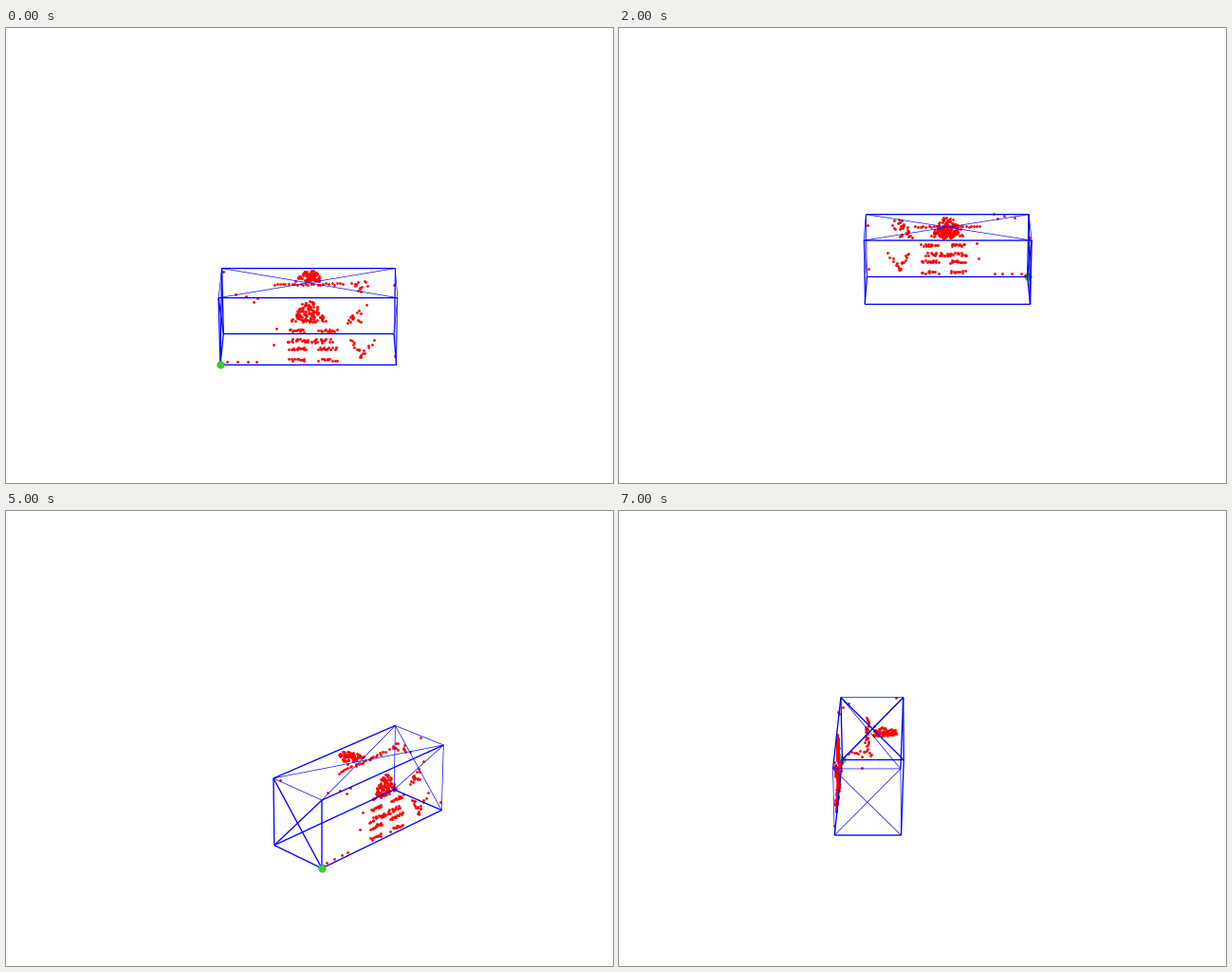
A matplotlib script that plays this animation: 640 px wide and 480 px high, repeating every 8000 ms.

```python
from itertools import combinations, product

import numpy as np
import matplotlib.pyplot as plt
from matplotlib.animation import FuncAnimation
from matplotlib.collections import LineCollection

W, H, DPI = 640, 480, 100
CX, CY, SCALE, DIST = 333.0, 237.4, 1997.8, 10.0
SIN, COS = np.sin(np.radians(25)), np.cos(np.radians(25))
AZIMUTHS = [270, 45, 90, 135, 180, 225, 315, 0]

X0, X1 = -0.5195, 0.381
Y0, Y1 = -0.5195, -0.1745
Z0, Z1 = -0.3896, -0.0065

rng = np.random.default_rng(7)


def project(p, azim):
    """Perspective view of 3D points as stage pixels."""
    x, y, z = np.moveaxis(np.asarray(p, float), -1, 0)
    a = np.radians(azim)
    right = y * np.cos(a) - x * np.sin(a)
    near = x * np.cos(a) + y * np.sin(a)
    dist = DIST - near * COS - z * SIN
    up = z * COS - near * SIN
    return np.stack([CX + SCALE * right / dist, CY - SCALE * up / dist], -1)


def on_front(pts):
    """Lift points of the front view onto the box's front face."""
    px, py = np.asarray(pts, float).T
    s = (CY - py) / SCALE
    z = (s * (DIST + Y0 * COS) - Y0 * SIN) / (COS + s * SIN)
    x = (px - CX) / SCALE * (DIST + Y0 * COS - z * SIN)
    return np.stack([x, np.full_like(x, Y0), z], -1)


def on_top(pts):
    """Lift points of the front view onto the box's top face."""
    px, py = np.asarray(pts, float).T
    s = (CY - py) / SCALE
    near = (Z1 * COS - s * (DIST - Z1 * SIN)) / (SIN - s * COS)
    x = (px - CX) / SCALE * (DIST - near * COS - Z1 * SIN)
    return np.stack([x, -near, np.full_like(x, Z1)], -1)


def line(xa, ya, xb, yb, n, noise=1.5):
    """Evenly spaced points along a segment, shaken a little."""
    pts = np.linspace((xa, ya), (xb, yb), n)
    return pts + rng.uniform(-noise, noise, (n, 2))


def cone(cx, ya, yb, wa, wb, n):
    """Points filling a trapezoid evenly from its ya side to its yb side."""
    t = (np.arange(n) + 0.5) / n
    half = np.sqrt(wa ** 2 + (wb ** 2 - wa ** 2) * t)
    y = ya + (yb - ya) * (half - wa) / (wb - wa)
    return np.stack([cx + half * rng.uniform(-1, 1, n), y], -1)


def front_face():
    parts = [cone(319, 288, 310, 5, 20, 110),
             line(297, 329.5, 342, 329.5, 36, 2.2),
             cone(370, 297, 311, 2, 11, 15),
             line(364, 327, 375, 346, 10, 2),
             line(387, 330, 371, 348, 9, 2),
             line(234, 352, 264, 352, 4, 0.7)]
    for y, n in (319.5, 12), (338, 15), (350, 10):
        parts += [line(299, y, 315, y, n), line(330, y, 348, y, n)]
    parts.append([(229, 354), (410, 346), (282, 334), (285, 317),
                  (261, 289), (380, 292)])
    return np.concatenate(parts)


def top_face():
    return np.concatenate([
        cone(319.5, 256, 267, 6, 16, 80),
        line(283, 270, 355, 270, 25, 1),
        cone(373, 279, 267, 3, 12, 14),
        line(242, 281, 265, 285, 3, 0.5),
        [(229, 257), (409, 271)],
    ])


def box_edges():
    """Edges and face diagonals; the bold ones are shared by two faces."""
    corners = list(product((X0, X1), (Y0, Y1), (Z0, Z1)))
    segs, widths = [], []
    for i, j in combinations(range(8), 2):
        step, far, upper = i ^ j, i & 4, i & 1
        if step in (1, 2, 3, 4) or (step == 6 and upper):
            bold = (step == 4 or (step == 2 and not upper)
                    or (step in (1, 3) and not far))
            segs.append((corners[i], corners[j]))
            widths.append(0.95 if bold else 0.5)
    return np.array(segs), widths


dots = np.concatenate([on_front(front_face()), on_top(top_face())])
origin = np.array([[X0, Y0, Z0]])
edges, widths = box_edges()

fig = plt.figure(figsize=(W / DPI, H / DPI), dpi=DPI, facecolor="white")
ax = fig.add_axes([0, 0, 1, 1])
ax.set(xlim=(0, W), ylim=(H, 0))
ax.axis("off")

red = ax.scatter([], [], s=2 ** 2, c="red", linewidths=0, zorder=2)
green = ax.scatter([], [], s=5.97 ** 2, c="limegreen", linewidths=0)
wire = ax.add_collection(LineCollection([], colors="blue", linewidths=widths,
                                        zorder=3, snap=False))


def draw(i):
    azim = AZIMUTHS[i % len(AZIMUTHS)]
    red.set_offsets(project(dots, azim))
    green.set_offsets(project(origin, azim))
    green.set_zorder(4 if 135 <= azim <= 270 else 1)
    wire.set_segments(project(edges, azim))
    return red, green, wire


anim = FuncAnimation(fig, draw, frames=len(AZIMUTHS), interval=1000,
                     repeat=True, repeat_delay=0, blit=False)
plt.show()
```
